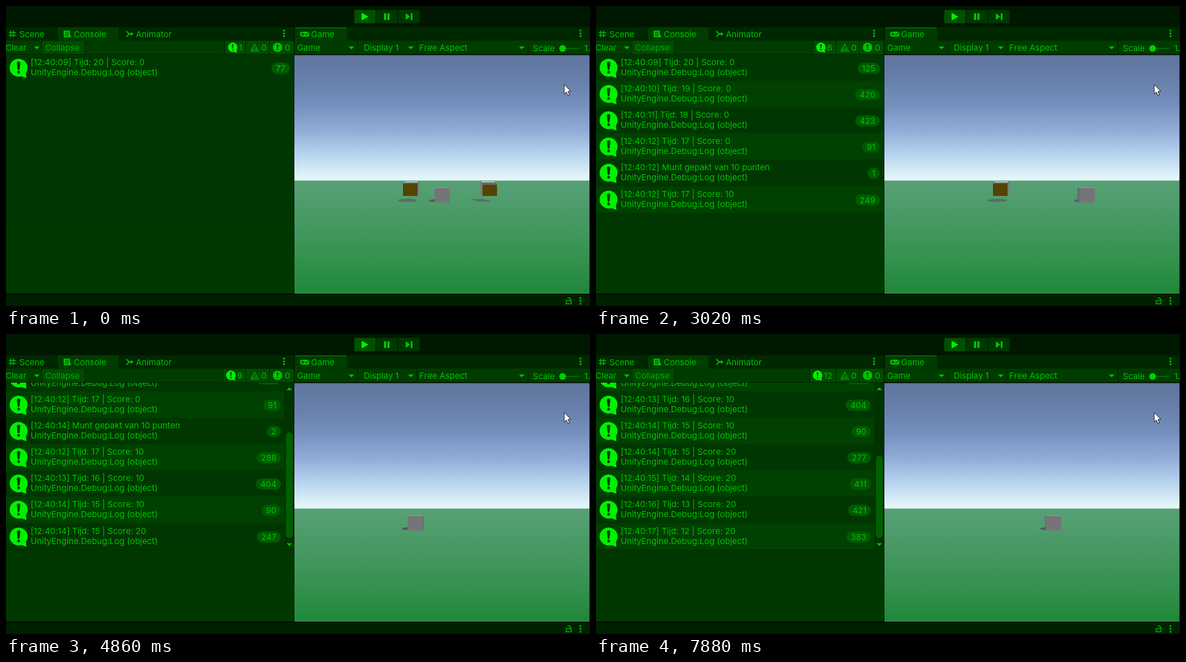
An HTML page with a canvas for the animation above (8 s loop, 1043x537 px).

```html
<!DOCTYPE html>
<html lang="nl">
<head>
<meta charset="utf-8">
<title>Console and game view</title>
<style>
  html, body { margin: 0; width: 100%; height: 100%; overflow: hidden; background: #001800; }
  canvas { display: block; }
</style>
</head>
<body>
<canvas id="stage" width="1043" height="537"></canvas>
<script>
const ctx = document.getElementById('stage').getContext('2d');
const LOOP = 8000, REPAINT = 200, STEP = 51.2;
const ROW = 47.1, LIST_TOP = 87, LIST_BOTTOM = 385.6;
const TEXT = '#00c400', BRIGHT = '#00f000', PANEL = '#003800', BAR = '#003c00', EDGE = '#002300';

// Messages logged in each second; a second is split where a coin is picked up.
const seconds = [[125], [420], [423], [91, 288], [404], [90, 277], [411], [421], [999]];
const logged = [[20, 77], [1620, 849], [2220, 1065], [3020, 1308], [4220, 1794], [4820, 2088], [6220, 2666], [7820, 3333]];

// Arrow key direction from each time on.
const keys = [[1650, 1], [2760, -1], [4500, 1], [5457, 0]];
const START_X = 779, SPEED = 0.116, RAMP = 300;

function interpolate(points, t) {
  const i = points.findIndex(p => t <= p[0]);
  if (i < 1) return points[i < 0 ? points.length - 1 : 0][1];
  const [a, from] = points[i - 1], [b, to] = points[i];
  return from + (to - from) * (t - a) / (b - a);
}

const travel = d => SPEED * (d < RAMP ? d * d / (2 * RAMP) : d - RAMP / 2);

function cubeX(time) {
  const t = Math.floor(time / STEP + 0.2) * STEP;
  let x = START_X;
  keys.forEach(([start, dir], i) => {
    if (t < start) return;
    const end = i + 1 < keys.length ? keys[i + 1][0] : LOOP;
    const d = Math.min(t, end) - start;
    const glide = Math.min(d, RAMP);
    x += dir ? dir * travel(d) : keys[i - 1][1] * SPEED * (glide - glide * glide / (2 * RAMP));
  });
  return x;
}

function rect(x, y, w, h, color) {
  ctx.fillStyle = color;
  ctx.fillRect(x, y, w, h);
}
function pill(x, y, w, h, r, color) {
  ctx.fillStyle = color;
  ctx.beginPath();
  ctx.roundRect(x, y, w, h, r);
  ctx.fill();
}
function poly(color, ...points) {
  ctx.fillStyle = color;
  ctx.beginPath();
  for (let i = 0; i < points.length; i += 2) ctx.lineTo(points[i], points[i + 1]);
  ctx.closePath();
  ctx.fill();
}
function oval(x, y, rx, ry, color) {
  ctx.fillStyle = color;
  ctx.beginPath();
  ctx.ellipse(x, y, rx, ry, 0, 0, 7);
  ctx.fill();
}
function line(color, width, ...points) {
  ctx.strokeStyle = color;
  ctx.lineWidth = width;
  ctx.beginPath();
  for (let i = 0; i < points.length; i += 4) {
    ctx.moveTo(points[i], points[i + 1]);
    ctx.lineTo(points[i + 2], points[i + 3]);
  }
  ctx.stroke();
}
function label(text, x, y, color = TEXT) {
  ctx.fillStyle = color;
  ctx.fillText(text, x, y);
}
const width = text => ctx.measureText(text).width;
const arrow = (x, y, dir = 1) => poly(TEXT, x - 5, y - 2.5 * dir, x + 5, y - 2.5 * dir, x, y + 2.5 * dir);
const dots = (x, y) => [-5, 0, 5].forEach(d => rect(x - 1.5, y + d - 1.5, 3, 3, TEXT));

function bang(x, y, s, color) {
  oval(x, y - 8 * s, 3 * s, 3 * s, color);
  poly(color, x - 3 * s, y - 8 * s, x + 3 * s, y - 8 * s, x + 1.5 * s, y + 4 * s, x - 1.5 * s, y + 4 * s);
  oval(x, y + 8 * s, 2.5 * s, 2.5 * s, color);
}
function infoIcon(x, y, s, hole) {
  oval(x, y, 16 * s, 16 * s, BRIGHT);
  poly(BRIGHT, x + 4 * s, y + 15 * s, x + 14 * s, y + 18.5 * s, x + 13 * s, y + 9 * s);
  bang(x, y, s, hole);
}

function drawTopBar() {
  rect(0, 0, 1043, 38, '#001800');
  pill(622, 7, 38, 24, 2, '#005000');
  rect(661, 7, 38, 24, '#003600');
  pill(700, 7, 39, 24, 2, '#003600');
  poly(BRIGHT, 635, 12, 635, 26, 647, 19);
  rect(675, 13, 4, 12, TEXT);
  rect(681, 13, 4, 12, TEXT);
  poly(TEXT, 714, 13, 714, 25, 722, 19);
  rect(723, 13, 3, 12, TEXT);
}

function drawTabs() {
  rect(0, 38, 1043, 24, '#002800');
  pill(93, 38, 108, 25, [3, 3, 0, 0], BAR);
  pill(516, 38, 93, 25, [3, 3, 0, 0], BAR);
  rect(517, 38, 91, 2, '#006400');
  line(TEXT, 1.4, 8.5, 44, 8.5, 56, 13.5, 44, 13.5, 56, 5, 47.5, 18, 47.5, 5, 52.5, 18, 52.5);
  label('Scene', 24, 56);
  rect(103, 44, 11, 12, TEXT);
  for (let y = 47; y < 54; y += 3) line(BAR, 1.2, 105, y, 112, y);
  rect(112, 52, 4, 4, TEXT);
  label('Console', 121, 56);
  line(TEXT, 1.8, 215, 45, 220, 50, 215, 55, 220, 50, 219, 50, 226, 50);
  poly(TEXT, 223, 46.5, 228, 50, 223, 53.5);
  label('Animator', 232, 56);
  dots(496.5, 49);
  pill(525, 46, 17, 9, 4.5, TEXT);
  line(BAR, 1.3, 527, 50.5, 533, 50.5, 530, 47.5, 530, 53.5);
  oval(536, 51.5, 1.2, 1.2, BAR);
  oval(539, 49.5, 1.2, 1.2, BAR);
  label('Game', 545, 56);
  dots(1026, 49);
}

function drawToolbars(count) {
  const toggled = '#004b00';
  rect(0, 62, 1043, 25, BAR);
  label('Clear', -1, 80);
  arrow(55, 75);
  rect(65, 63, 75, 23, toggled);
  label('Collapse', 70, 80, '#00ac00');
  const start = 422 - width(count), left = Math.round(start - 25);
  rect(left, 63, 514 - left, 23, toggled);
  [64, 140, left - 1, 427.5, 470, 627, 733, 932].forEach(x => rect(x, 62, 1, 25, EDGE));
  infoIcon(start - 11, 74, 0.53, toggled);
  label(count, start, 80);
  poly('#008400', 444, 66, 452.5, 82, 435.5, 82);
  bang(444, 76, 0.38, toggled);
  label('0', 456, 80);
  poly(TEXT, 481.5, 66, 488.5, 66, 493, 70.5, 493, 77.5, 488.5, 82, 481.5, 82, 477, 77.5, 477, 70.5);
  bang(485, 74, 0.5, toggled);
  label('0', 498, 80);

  label('Game', 520, 80);
  arrow(617, 75);
  label('Display 1', 639, 80);
  arrow(723, 75);
  label('Free Aspect', 738, 80);
  arrow(921, 75);
  label('Scale', 941, 81);
  rect(994, 75, 31, 2, '#006400');
  oval(994, 76, 6, 6, '#00d000');
  label('1.', 1033, 81);
  rect(0, 86, 1043, 1, EDGE);
}

function visibleRows(total) {
  const rows = [];
  let left = total, score = 0, coin;
  seconds.forEach((parts, i) => parts.forEach((limit, part) => {
    if (left <= 0) return;
    const second = 9 + i;
    if (part) {
      score += 10;
      if (!coin) rows.push(coin = { text: 'Munt gepakt van 10 punten', count: 0 });
      coin.second = second;
      coin.count++;
    }
    rows.push({ second, text: `Tijd: ${20 - i} | Score: ${score}`, count: Math.min(left, limit) });
    left -= limit;
  }));
  return rows;
}

function drawRows(rows, scrolled) {
  const right = scrolled ? 491 : 507;
  const origin = scrolled ? LIST_BOTTOM - ROW * rows.length : LIST_TOP;
  ctx.save();
  ctx.beginPath();
  ctx.rect(0, LIST_TOP, 514, 299);
  ctx.clip();
  rows.forEach((row, i) => {
    const y = Math.round(origin + i * ROW);
    const back = i % 2 ? '#004000' : '#003700';
    rect(0, y, 514, 48, back);
    infoIcon(22.5, y + 23.5, 1, back);
    label(`[12:40:${String(row.second).padStart(2, '0')}] ${row.text}`, 44, y + 19);
    label('UnityEngine.Debug:Log (object)', 44, y + 37);
    const w = width(row.count);
    pill(right - w - 16, y + 14.5, w + 16, 20, 10, '#005a00');
    label(row.count, right - w - 8, y + 30);
  });
  if (!scrolled) rect(0, Math.round(origin + rows.length * ROW), 514, 300, '#003700');
  ctx.restore();
  if (scrolled) {
    const h = 21 + 1512 / rows.length;
    rect(497, 87, 17, 299, '#003300');
    arrow(506, 98, -1);
    arrow(506, 377);
    pill(500, 365 - h, 12, h, 6, '#005f00');
  }
}

function drawConsole(t) {
  const painted = Math.floor((t - 20) / REPAINT) * REPAINT + 20;
  const rows = visibleRows(Math.round(interpolate(logged, painted)));
  drawToolbars(String(rows.length));
  rect(0, 87, 514, 429, PANEL);
  drawRows(rows, rows.length > 6 && painted > 3300);
  rect(0, 386, 514, 1, '#002a00');
}

function gradient(top, bottom, ...colors) {
  const g = ctx.createLinearGradient(0, top, 0, bottom);
  colors.forEach((color, i) => g.addColorStop(i / (colors.length - 1), color));
  return g;
}
const sky = gradient(88, 312, '#5f759d', '#677faa', '#7590bd', '#90acd6', '#b8d5ef', '#e8f9fa');
const ground = gradient(312, 515, '#58a076', '#4c9b69', '#3f965a', '#30904a', '#208739');

function drawCoin(x, y, side) {
  const inner = side < 0 ? x + 25 : x, dx = -4 * side;
  poly('#72807a', inner, y, inner + dx, 314, inner + dx, 338, inner, 340);
  poly('#5d6f68', x, y, x + 26, y, x + 26 + dx, 314, x + dx, 314);
  rect(x + (side < 0 ? 3 : -2), 314, 24, 1.6, '#c4dcec');
  rect(x, y, 26, 340 - y, '#554300');
}

function drawCube(x) {
  const left = x - 13.5, depth = (x - START_X) * 0.04;
  const edge = depth > 0 ? left : left + 27;
  oval(left - 1, 348.5, 9, 2.4, '#4c6054');
  poly(depth > 0 ? '#626b7a' : '#6b6b6b', edge, 325, edge - depth, 326, edge - depth, 350, edge, 352);
  rect(left, 325, 27, 27, '#757477');
  rect(left, 325, 27, 1, '#959b9b');
}

function drawGame(t) {
  rect(514, 87, 529, 429, '#000c00');
  rect(515, 88, 527, 224, sky);
  rect(515, 312, 527, 203, ground);
  rect(515, 312, 527, 1, '#9cc7b4');
  if (t < 4180) {
    oval(717, 348, 17, 3, '#5b6d62');
    drawCoin(709, 318, -1);
  }
  if (t < 2210) {
    poly('#5b6d62', 829, 345.5, 850, 345.5, 868, 349, 862, 350.5, 845, 350);
    drawCoin(851, 320, 1);
  }
  drawCube(cubeX(t));
}

function drawCursor() {
  poly('#fff', 997, 140.5, 997, 157.5, 1000.8, 154, 1003.4, 160, 1006.2, 158.8, 1003.6, 153, 1008.5, 152.5);
  ctx.strokeStyle = '#111';
  ctx.lineWidth = 1;
  ctx.stroke();
}

function drawFooter() {
  rect(0, 514, 514, 1, EDGE);
  rect(0, 515, 1043, 22, '#002100');
  rect(0, 515, 1043, 2, '#000f00');
  rect(514, 38, 1, 478, '#000c00');
  ctx.strokeStyle = TEXT;
  ctx.lineWidth = 1.4;
  ctx.strokeRect(1000.5, 527.5, 9, 5.5);
  ctx.beginPath();
  ctx.moveTo(1003, 523.5);
  ctx.quadraticCurveTo(1008.5, 520.5, 1008.5, 527);
  ctx.stroke();
  dots(1026, 528);
}

function draw() {
  const t = performance.now() % LOOP;
  ctx.font = '15px Inter, sans-serif';
  // The editor sets its text glyph by glyph, without kerning or contextual forms.
  ctx.fontKerning = 'none';
  ctx.textRendering = 'optimizeSpeed';
  ctx.letterSpacing = '0.01px';
  drawTopBar();
  drawTabs();
  drawConsole(t);
  drawGame(t);
  drawFooter();
  drawCursor();
  requestAnimationFrame(draw);
}
draw();
</script>
</body>
</html>
```
